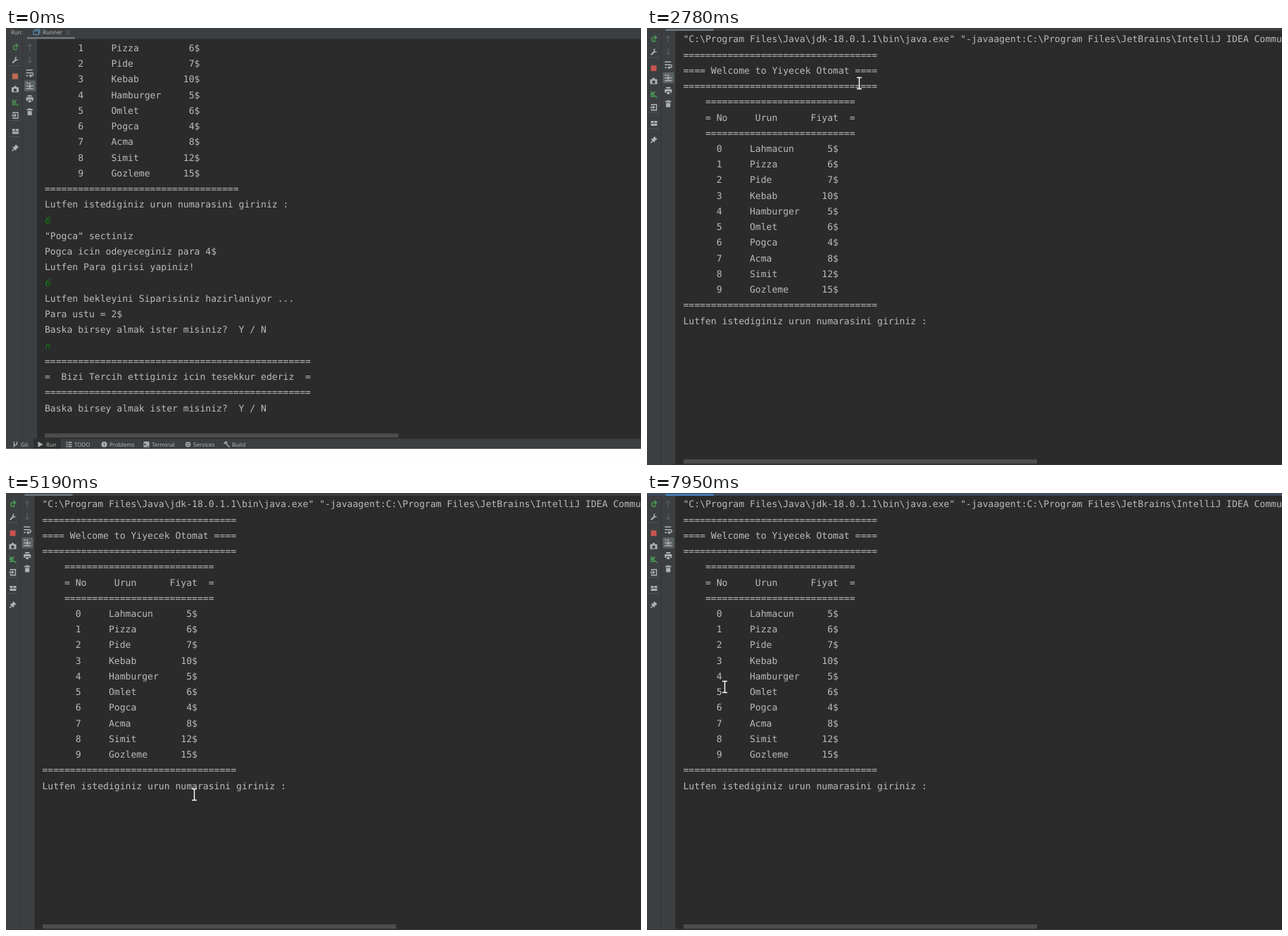
These frames come from a looping animation (902 by 621 pixels, 8000 ms). An HTML page:

```html
<!DOCTYPE html>
<html lang="tr">
<head>
<meta charset="utf-8">
<title>Console</title>
<style>
html, body { margin: 0; width: 100%; height: 100%; overflow: hidden; background: #2b2b2b; }
svg { display: block; width: 100%; height: 100%; }
text { text-rendering: geometricPrecision; white-space: pre; }
.mono { font: 13.09px "DejaVu Sans Mono", monospace; fill: #bbb; }
.typed { fill: #107c10; }
.ui { font: 8px "Open Sans", sans-serif; fill: #bbb; }
.line { fill: none; stroke: #afb1b3; stroke-width: 1.4; }
.solid { fill: #afb1b3; fill-rule: evenodd; }
.dim { fill: none; stroke: #65686a; }
.go { fill: none; stroke: #4a8a50; stroke-width: 1.6; }
.stop { fill: #bd6a52; }
.late .go { stroke: #499c54; }
.late .stop { fill: #c75450; }
</style>
</head>
<body>
<svg viewBox="0 0 902 621" preserveAspectRatio="none">
  <rect width="902" height="621" fill="#2b2b2b"/>
  <g id="chrome">
    <rect x="-5" y="-5" width="49" height="650" fill="#3c3f41"/>
    <rect id="head" x="-5" y="-5" width="920" height="20.4" fill="#3c3f41"/>
    <rect id="tab" x="30" y="13" width="68" height="2.4" fill="#747a80"/>
    <path d="M23.5 15.5V640" stroke="#323436"/>
    <rect x="26" y="74.5" width="16" height="15.5" rx="1.5" fill="#5c6164"/>
    <text class="ui" x="7" y="9">Run:</text>
    <text class="ui" x="52" y="9" style="font-size:8.2px">Runner</text>
    <path d="M40.5 2H48V8M39 4H46.5V9.5H39Z" fill="none" stroke="#5a9fc4"/>
  </g>
  <g id="first">
    <rect x="55" y="576.2" width="502.5" height="5.8" fill="#4d4d4d"/>
    <rect y="583.5" width="902" height="14.5" fill="#3c3f41"/>
    <rect x="39.5" y="583.5" width="38.5" height="14.5" fill="#2d2f30"/>
    <rect y="598" width="902" height="23" fill="#fefefe"/>
  </g>
  <g id="second">
    <rect x="52" y="613" width="502" height="6" fill="#4d4d4d"/>
    <rect y="620" width="902" height="1" fill="#3d3538"/>
    <rect id="tip" x="846" y="613.3" width="35" height="8" fill="#8b8b8b"/>
  </g>
  <rect id="caret" x="51" y="429" width="2" height="18" fill="#bbb"/>
  <path id="beam" d="M-3.5 -8H3.5M0 -8V8M-3.5 8H3.5" fill="none" stroke="#fff" stroke-width="1.4"/>
</svg>
<script>
const $ = id => document.getElementById(id);
const bar = n => '='.repeat(n);

function add(parent, tag, attrs, str = '') {
  const el = document.createElementNS('http://www.w3.org/2000/svg', tag);
  for (const k in attrs) el.setAttribute(k, attrs[k]);
  el.textContent = str;
  $(parent).append(el);
}
const label = (parent, str, x, y, cls, transform = '') =>
  add(parent, 'text', { class: cls, transform: `translate(${x} ${y}) ${transform}` }, str);
const icon = (parent, [cls, d], x, y) =>
  add(parent, 'path', { class: cls, d, transform: `translate(${x} ${y})` });

// each icon is drawn around its own centre
const icons = {
  rerun: ['go', 'M3 -2H-1A3 3 0 1 0 3 2M1 -5L4 -2L1 1'],
  wrench: ['line', 'M-4 4L1 -1M2 -4A2 2 0 1 0 4 -1M-3 4L2 -1'],
  stop: ['stop', 'M-4 -4H4V4H-4Z'],
  camera: ['solid', 'M-5 -3H-2L-1 -5H1L2 -3H5V4H-5ZM-2 -1H2V3H-2Z'],
  bug: ['go', 'M-4 -4L-2 -2M2 -4L0 -2M-5 0H1M-4 4L-2 2M-3 -2H0V3H-3ZM1 2L5 5'],
  exit: ['line', 'M-3 -2V-4H4V4H-3V2M-5 0H1M-1 -2L1 0L-1 2'],
  layout: ['solid', 'M-4 -4H0V-1H-4ZM1 -4H5V-1H1ZM-4 0H5V3H-4Z'],
  pin: ['solid', 'M1 -5L5 -1L2 1L1 4L-1 2L-4 5L-5 4L-2 1L-4 -1L-1 -2Z'],
  up: ['dim', 'M0 5V-4M-3 -1L0 -4L3 -1'],
  down: ['dim', 'M0 -5V4M-3 1L0 4L3 1'],
  wrap: ['line', 'M-5 -4H4M-5 0H3A2 2 0 0 1 3 4H0M2 2L0 4L2 6M-5 4H-2'],
  scroll: ['line', 'M-5 4H5M-5 0H-2M2 0H5M0 -5V2M-2 0L0 2L2 0M-5 -4H-2'],
  print: ['solid', 'M-3 -5H3V-3H-3ZM-5 -2H5V3H3V1H-3V3H-5ZM-2 2H2V5H-2Z'],
  trash: ['solid', 'M-4 -4H-1V-5H1V-4H4V-2H-4ZM-3 -1H3V5H-3Z'],
  close: ['dim', 'M-2 -2L3 3M3 -2L-2 3'],
  Git: ['line', 'M-2 -4V4M2 -4V-1Q2 1 -2 1'],
  Run: ['solid', 'M-4 -4L3 0L-4 4Z'],
  TODO: ['line', 'M-4 -3H-2M-1 -3H4M-4 0H-2M-1 0H4M-4 3H-2M-1 3H4'],
  Problems: ['solid', 'M-4 0A4 4 0 0 1 4 0A4 4 0 0 1 -4 0ZM-.5 -2H.5V1H-.5ZM-.5 2H.5V3H-.5Z'],
  Terminal: ['solid', 'M-4 -4H4V4H-4ZM-3 -2L0 0L-3 2ZM0 2H3V3H0Z'],
  Services: ['line', 'M-3 0A3 3 0 0 1 3 0A3 3 0 0 1 -3 0M-1 -1L1 0L-1 1'],
  Build: ['line', 'M-4 -1L-1 -4L1 -2M-2 -2L4 4']
};

// left toolbar: even spacing, with a rule and a gap between groups
let y = 27;
['rerun wrench', 'stop camera bug exit', 'layout', 'pin'].forEach((group, i) => {
  if (i) {
    add('chrome', 'path', { d: `M5 ${Math.round(y - 11.5) + .5}H20`, stroke: '#515456' });
    y += 4.7;
  }
  for (const name of group.split(' ')) {
    icon('chrome', icons[name], 13, y);
    y += 18.5;
  }
});
'up down wrap scroll print trash'.split(' ').forEach((name, i) =>
  icon('chrome', icons[name], 33.7, 27 + i * 18.4));
icon('chrome', icons.close, 87, 6);

const tabs = { Git: 21, Run: 57, TODO: 97, Problems: 147, Terminal: 207, Services: 266, Build: 321 };
for (const name in tabs) {
  icon('first', icons[name], tabs[name] - 7.5, 591.8);
  label('first', name, tabs[name], 595, 'ui');
}

const menu = ['Lahmacun 5', 'Pizza 6', 'Pide 7', 'Kebab 10', 'Hamburger 5',
  'Omlet 6', 'Pogca 4', 'Acma 8', 'Simit 12', 'Gozleme 15'].map((s, i) => {
  const [name, price] = s.split(' ');
  return '      ' + i + '     ' + name.padEnd(10) + (price + '$').padStart(6);
});
const ask = 'Lutfen istediginiz urun numarasini giriniz :';
const again = 'Baska birsey almak ister misiniz?  Y / N';

// lines starting with > are typed by the user
const order = [...menu.slice(1), bar(35), ask, '>6', '"Pogca" sectiniz',
  'Pogca icin odeyeceginiz para 4$', 'Lutfen Para girisi yapiniz!', '>6',
  'Lutfen bekleyini Siparisiniz hazirlaniyor ...', 'Para ustu = 2$', again, '>n',
  bar(48), '=  Bizi Tercih ettiginiz icin tesekkur ederiz  =', bar(48), again];

const welcome = [
  String.raw`"C:\Program Files\Java\jdk-18.0.1.1\bin\java.exe" "-javaagent:C:\Program Files\JetBrains\IntelliJ IDEA Community`,
  bar(35), '==== Welcome to Yiyecek Otomat ====', bar(35),
  '    ' + bar(27), '    = No     Urun      Fiyat  =', '    ' + bar(27),
  ...menu, bar(35), ask];

function print(parent, lines, x, top) {
  lines.forEach((s, i) => {
    const at = top + i * 22.24;
    if (s[0] === '>') label(parent, s.slice(1), x, at, 'mono typed', 'skewX(-10)');
    else label(parent, s, x, at, 'mono');
  });
}
print('first', order, 55, 33);
print('second', welcome, 51.5, 20.3);

// key points of the pointer: time, x, y
const path = [
  [150, 750, 396], [300, 874, 588], [1260, 869, 618], [1630, 65, 247],
  [1850, 60, 130], [2030, 98, 80], [2700, 308, 62], [2780, 302, 77], [2880, 212, 131],
  [3300, 79, 155], [3720, 110, 201], [4000, 182, 262], [4570, 51, 433],
  [5200, 270, 428], [5710, 395, 424], [5860, 395, 424], [5960, 216, 429],
  [6430, 58, 434], [7300, 58, 434], [7800, 153, 256], [7950, 110, 275], [8000, 110, 275]];

function pointAt(t) {
  const i = Math.max(1, path.findIndex(p => p[0] >= t));
  const a = path[i - 1], b = path[i];
  const k = (t - a[0]) / (b[0] - a[0]);
  return [1, 2].map(n => Math.round(a[n] + (b[n] - a[n]) * k) + .5);
}
const show = (id, on) => $(id).setAttribute('visibility', on ? 'visible' : 'hidden');

function draw(t) {
  const late = t >= 770, focus = t >= 6380;
  $('first').style.display = late ? 'none' : '';
  $('second').style.display = late ? '' : 'none';
  $('chrome').setAttribute('transform', late ? 'translate(-3.5 -11.5)' : '');
  $('chrome').setAttribute('class', late ? 'late' : '');
  $('head').setAttribute('fill', focus ? '#3d4b5a' : '#3c3f41');
  $('tab').setAttribute('fill', focus ? '#4a88c7' : '#747a80');
  show('tip', t < 820);
  show('caret', focus && (t - 6380) % 920 < 460);
  const moving = t >= 1260 || (t >= 150 && t < 350);
  show('beam', moving);
  if (moving) $('beam').setAttribute('transform', `translate(${pointAt(t).join(' ')})`);
}
const start = performance.now();
function tick() {
  draw((performance.now() - start) % 8000);
  requestAnimationFrame(tick);
}
tick();
</script>
</body>
</html>
```
